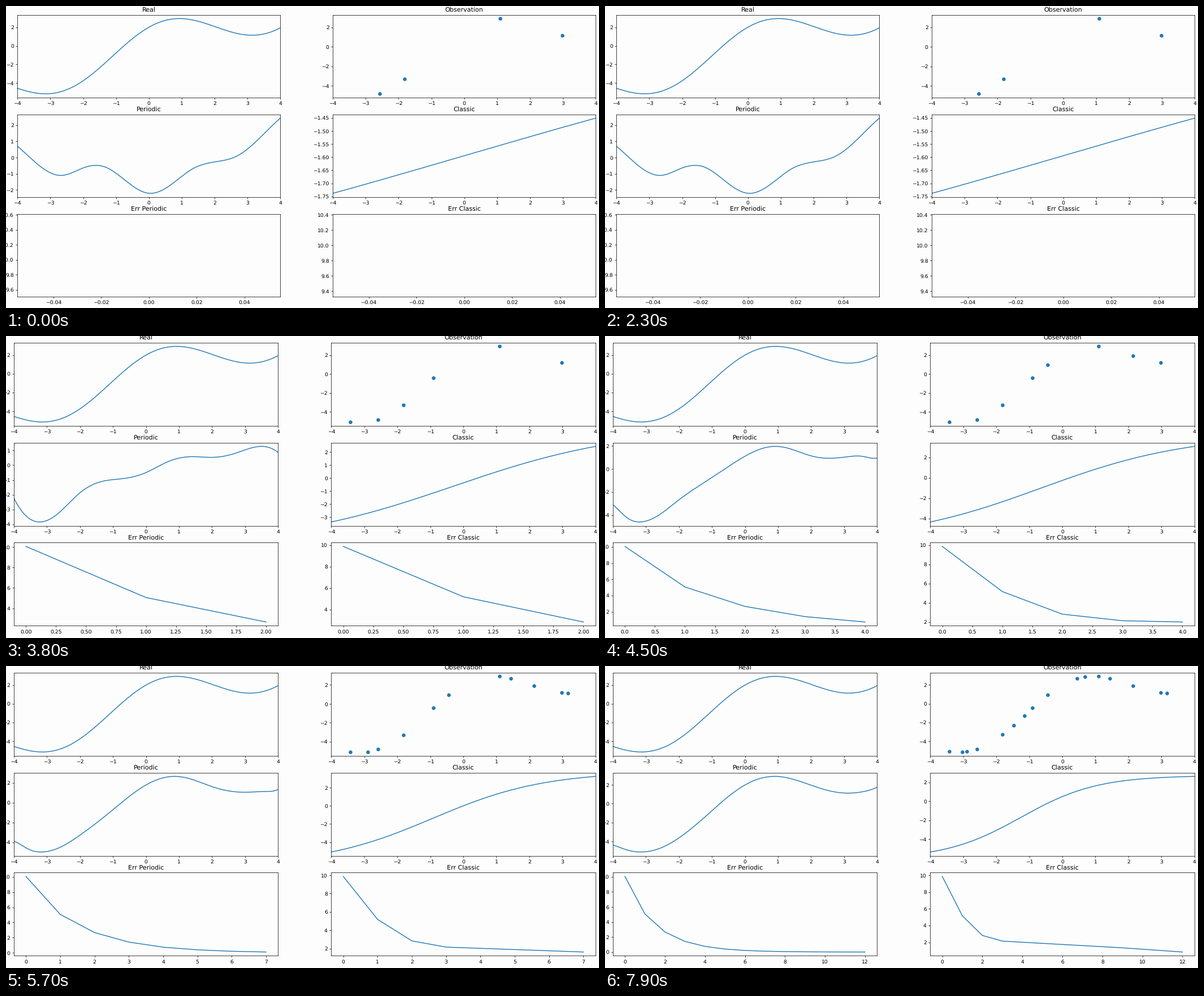
These frames come from a looping animation (1049x534 px, 8000 ms). A matplotlib script:

```python
import numpy as np
import matplotlib.pyplot as plt
from matplotlib.animation import FuncAnimation

W, H, DPI = 1049, 534, 64
S = 1.04  # scale of fonts, lines and ticks
FRAMES, STEP_MS = 80, 100
HOLD, PER_ITER, LAST = 29, 4, 12

plt.rcParams.update({
    "font.family": "DejaVu Sans", "font.size": 10 * S, "text.hinting": "none",
    "axes.titlesize": 12 * S, "axes.titlepad": 6 * S, "axes.titley": 1.0,
    "axes.linewidth": 0.8 * S, "lines.linewidth": 1.5 * S,
    "lines.markersize": 6 * S,
})
for axis in ("xtick", "ytick"):
    plt.rcParams.update({f"{axis}.major.size": 3.5 * S,
                         f"{axis}.major.pad": 3.5 * S,
                         f"{axis}.major.width": 0.8 * S})

x = np.linspace(-4, 4, 201)


def real(t):
    return t + np.sin(t) + 2 * np.cos(t)


def spline(y):
    """Not-a-knot cubic through evenly spaced values on [-4, 4]."""
    y = np.array(y)
    n = len(y)
    h = 8 / (n - 1)
    a, b = np.zeros((n, n)), np.zeros(n)
    for i in range(1, n - 1):
        a[i, i - 1:i + 2] = 1, 4, 1
        b[i] = 6 * (y[i - 1] - 2 * y[i] + y[i + 1]) / h**2
    a[0, :3] = a[-1, -3:] = 1, -2, 1
    m = np.linalg.solve(a, b)
    i = np.clip(((x + 4) / h).astype(int), 0, n - 2)
    u = (x + 4) / h - i
    v = 1 - u
    return (v * y[i] + u * y[i + 1]
            + h**2 / 6 * ((v**3 - v) * m[i] + (u**3 - u) * m[i + 1]))


def bump(t, centre, width):
    return np.exp(-((t - centre) / width) ** 2)


# Untrained guess and the fit after two iterations
guess = spline([.70, -.5, -1.1, -.64, -.58, -1.49, -2.2,
                -1.68, -.69, -.27, .08, 1.13, 2.43])
early = spline([-2.23, -3.82, -3.28, -1.87, -1.1, -.9, -.5,
                .24, .575, .53, .78, 1.24, .86])

# The remaining error has an odd part that fades slowly and a faster rest
slow = -np.sign(x) * (1.66 * bump(abs(x), 2, .85) + 2.6 * bump(abs(x), 4, .42))
fast = early - real(x) - slow


def periodic(k):
    if k < 2:
        return guess + (early - guess) * k / 2
    return real(x) + slow * .77 ** (k - 2) + fast * .6 ** (k - 2)


def classic(k):
    """Sigmoid whose end values, steepness and centre drift with training."""
    def drift(*values):
        return np.interp(k, [0, 2, 5, 8, 12], values)
    left = drift(-1.738, -3.37, -4.83, -5.2, -5.36)
    right = drift(-1.451, 2.43, 3.4, 3.16, 2.63)
    steep = drift(.06, .19, .24, .324, .435)
    centre = drift(0, -.3, -.8, -.99, -1.25)
    s = np.tanh(steep * (x - centre))
    return left + (right - left) * (s - s[0]) / (s[-1] - s[0])


its = np.arange(LAST + 1)
err_periodic = 9.5 * .53 ** its + .56 * .05 ** its
err_classic = np.interp(its, [0, 1, 2, 3, 9, 12], [9.87, 5.18, 2.83, 2.15, 1.35, .85])

# Four starting samples, then one more per iteration
seen = np.array([-2.58, -1.81, 1.09, 2.975, -3.425, -.9, -.445, 2.145, 3.16,
                 -2.89, 1.445, -3.03, .69, -1.48, -1.155, .44])

fig = plt.figure(figsize=(W / DPI, H / DPI), dpi=DPI, facecolor="#fdfdfd")
titles = ["Real", "Observation", "Periodic", "Classic", "Err Periodic", "Err Classic"]
axes, lines = [], []
for n, title in enumerate(titles):
    ax = fig.add_axes([0, 0, 1, 1], label=title, facecolor="none")
    ax.set_title(title)
    style = "o" if title == "Observation" else "-"
    lines += ax.plot([], [], style, color="#1f77b4")
    if n < 4:
        ax.set_xlim(-4, 4)
    axes.append(ax)

# left, column pitch, top, row pitch, width, height in pixels
FIRST = 20.3, 557.9, 15.6, 176, 465, 146.3
LATER = 14, 561.4, 11.7, 176.85, 467.3, 147


def place(left, dx, top, dy, w, h):
    for n, ax in enumerate(axes):
        row, col = divmod(n, 2)
        ax.set_position([(left + col * dx) / W, 1 - (top + row * dy + h) / H,
                         w / W, h / H])


def update(i):
    k = min(max((i - HOLD) // PER_ITER, 0), LAST)
    place(*(LATER if k else FIRST))
    pts, done = seen[:4 + k], slice(k + 1)
    data = [(x, real(x)), (pts, real(pts)), (x, periodic(k)), (x, classic(k)),
            (its[done], err_periodic[done]), (its[done], err_classic[done])]
    for ax, line, xy in zip(axes, lines, data):
        line.set_data(*xy)
        ax.relim()
        ax.autoscale_view()
    return lines


anim = FuncAnimation(fig, update, frames=FRAMES, interval=STEP_MS,
                     init_func=lambda: update(0), repeat=True,
                     repeat_delay=0, blit=False)
plt.show()
```
